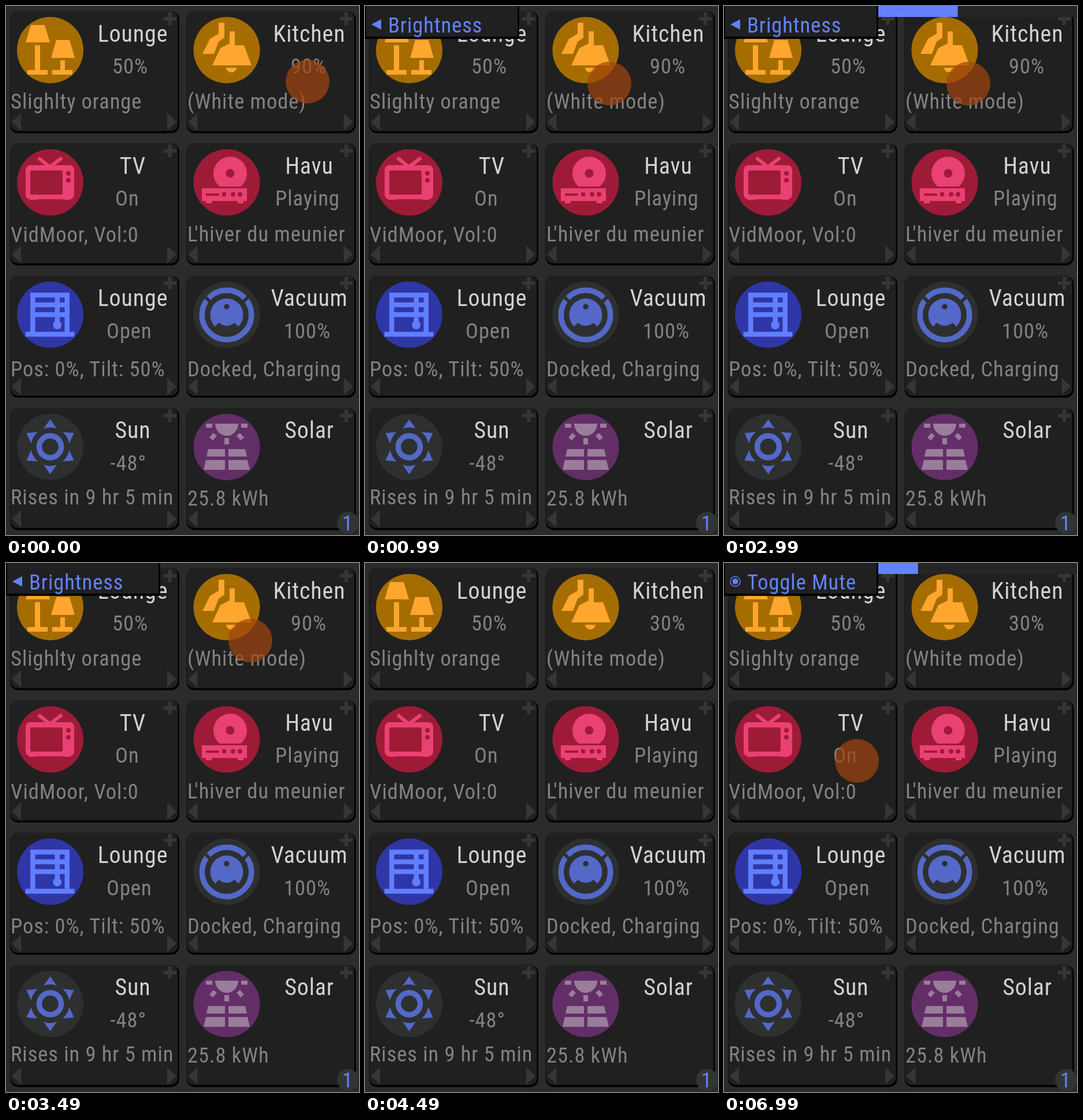
These frames come from a looping animation (611 px wide and 917 px high, 7.99 s). An HTML page:

```html
<!DOCTYPE html>
<html lang="en">
<head>
<meta charset="utf-8">
<title>Home panel</title>
<style>
html, body { margin: 0; width: 100%; height: 100%; overflow: hidden; background: #2a2c2a; }
svg { display: block; }
text { font: 36.5px "Roboto Condensed", Roboto, sans-serif; font-stretch: 75%; letter-spacing: .026em; fill: #828282; white-space: pre; }
.title { font-size: 40px; letter-spacing: .022em; fill: #d2d2d2; text-anchor: middle; }
#popup text, #badge text { fill: #6482ff; }
#popup .sign { font: 34px "DejaVu Sans", sans-serif; }
</style>
</head>
<body>
<svg id="stage" width="611" height="917" viewBox="0 0 611 917">
  <g id="cards"></g>

  <g id="icons">
    <!-- floor lamps -->
    <path fill="#ffa62f" d="M43 33H67L76 63H34ZM50 68h9v43h13v8H37v-8H50ZM87 59h23l9 31H78ZM94 94h8v17h13v8H80v-8h14Z"/>
    <!-- pendant lamps -->
    <path fill="#ffa62f" d="M368 29h10v26l-10 7-8 21h-20l13-26 15-9ZM387 44h9v24h16l13 35H357l14-30 16-8ZM381 107h18a9 8 0 0 1-18 0Z"/>
    <!-- television -->
    <g fill="#ea4173">
      <path d="M56 263L76 279 97 263" fill="none" stroke="#ea4173" stroke-width="6"/>
      <rect x="34" y="276" width="84" height="59" rx="8"/>
      <path d="M41 333h12v3H41ZM100 333h11v3h-11Z"/>
    </g>
    <g fill="#9e1b38">
      <rect x="42" y="285" width="56" height="42" rx="3"/>
      <circle cx="108" cy="290" r="4"/><circle cx="108" cy="302" r="4"/>
    </g>
    <!-- disc player -->
    <path fill="#ea4173" d="M370 313a29 29 0 1 1 36 0ZM339 316h78v22h-6v4h-10v-4h-45v4h-10v-4h-7Z"/>
    <g fill="#9e1b38">
      <circle cx="388" cy="290" r="7.5"/>
      <path d="M346 325h23v4h-23ZM374 323h7v7h-7Z"/>
      <circle cx="393" cy="326.500" r="4"/><circle cx="405" cy="326.500" r="4"/>
    </g>
    <!-- blinds -->
    <g transform="translate(76 535) scale(4.25)">
      <path fill="#607eff" d="M-8-9H8V7h2v2h-20V7h2Z"/>
      <path fill="#2f36a6" d="M-6-7h8v2h-8ZM4-7h2v2H4ZM-6-3h8v2h-8ZM4-3h2v2H4ZM-6 1H6v6H-6Z"/>
      <path fill="#607eff" d="M2 1h2v2H2Z"/>
      <circle cx="3" cy="4.250" r="1.750" fill="#607eff"/>
    </g>
    <!-- robot vacuum -->
    <g transform="translate(382 535.500) scale(4.75)" fill="#5468c8">
      <circle r="9" fill="none" stroke="#5468c8" stroke-width="2"/>
      <path d="M-8.500-7.250l3 3M8.500-7.250l-3 3" stroke="#2d302f" stroke-width="1.200"/>
      <path d="M-4.240 4.240A6 6 0 1 1 4.240 4.240L2.830 2.830A4 4 0 0 1-2.830 2.830Z"/>
      <circle cy="-3" r="1" fill="#2d302f"/>
    </g>
    <!-- sun -->
    <g transform="translate(76.500 764) scale(4.75)" fill="#5468c8">
      <circle r="4" fill="none" stroke="#5468c8" stroke-width="2"/>
      <g id="rays"></g>
    </g>
    <!-- solar panels -->
    <path fill="#997d9a" d="M362 724h40a20 21 0 0 1-40 0ZM346 724h11v7h-11ZM407 724h11v7h-11ZM378 749h8v11h-8ZM359 740l6 5-7 8-6-5ZM405 740l7 8-6 5-7-8ZM350 768h29v13h-32ZM385 768h29l3 13h-32ZM346 787h33v17h-37ZM385 787h33l4 17h-37Z"/>
  </g>

  <g id="badge">
    <circle cx="592" cy="896" r="19" fill="#323533"/>
    <text x="582" y="909">1</text>
  </g>

  <g id="bar">
    <rect x="267" width="344" height="19" fill="#242524"/>
    <rect id="fill" x="267" height="19" fill="#6482ff"/>
  </g>

  <g id="popup">
    <rect width="267" height="57"/>
    <rect x="2" width="262" height="53" fill="#202020"/>
    <g id="slide">
      <path d="M11 32l17-9v18Z" fill="#6482ff"/>
      <text x="40" y="46">Brightness</text>
    </g>
    <g id="hold">
      <circle cx="19.500" cy="32" r="8.500" fill="none" stroke="#6482ff" stroke-width="1.500"/>
      <path d="M19.500 23.500a8.500 8.500 0 0 1 0 17Z" fill="#6482ff"/>
      <text class="sign" x="46" y="45">✘</text>
      <text x="83" y="46">(Popup)</text>
    </g>
    <g id="press">
      <circle cx="19.500" cy="32" r="8.500" fill="none" stroke="#6482ff" stroke-width="1.500"/>
      <circle cx="19.500" cy="32" r="5" fill="#6482ff"/>
      <text x="40" y="46">Toggle Mute</text>
    </g>
  </g>

  <circle id="touch" r="38" fill="rgb(163,69,15)" fill-opacity=".7"/>
</svg>
<script>
const $ = id => document.getElementById(id);

// title, value, value x, detail, detail baseline, icon background
const cards = [
  ["Lounge", "50%", 184, "Slighlty orange", 178, "#a56d00"],
  ["Kitchen", "90%", 493, "(White mode)", 178, "#a56d00"],
  ["TV", "On", 189, "VidMoor, Vol:0", 409, "#9e1b38"],
  ["Havu", "Playing", 466, "L'hiver du meunier", 408, "#9e1b38"],
  ["Lounge", "Open", 174, "Pos: 0%, Tilt: 50%", 642, "#2f36a6"],
  ["Vacuum", "100%", 481, "Docked, Charging", 642, "#2d302f"],
  ["Sun", "-48°", 180.5, "Rises in 9 hr 5 min", 864, "#2d302f"],
  ["Solar", "", 0, "25.8 kWh", 866, "#632e67"]
];

$("cards").innerHTML = cards.map(([title, value, valueX, detail, detailY, color], i) => {
  const x = i % 2 * 305.5, y = (i >> 1) * 229.3;
  const next = i < 7 ? "M279 186v30l16-15Z" : "";
  return `<g transform="translate(${x} ${y})">
    <rect x="7" y="9" width="293" height="211.500" rx="14"/>
    <rect x="7.500" y="8.500" width="290" height="208.500" rx="13" fill="#202020"/>
    <path d="M26 186v30l-16-15Z${next}" fill="#363636"/>
    <path d="M272.500 22h22M283.500 11v22" stroke="#363636" stroke-width="6"/>
    <circle cx="76.500" cy="76.500" r="57.500" fill="${color}"/>
    <text class="title" x="219.500" y="61.500">${title}</text>
  </g>
  <text id="value${i}" x="${valueX}" y="${117 + y}">${value}</text>
  <text x="${i % 2 ? 314 : 8}" y="${detailY}">${detail}</text>`;
}).join("");

$("rays").innerHTML = [0, 1, 2, 3, 4, 5].map(i =>
  `<path d="M0-10L2.400-6.600A7 7 0 0 0-2.400-6.600Z" transform="rotate(${i * 60})"/>`).join("");

const steps = [
  { at: 0, touch: [522, 131], level: 90 },
  { at: 500, touch: [465, 133], level: 90, popup: "hold" },
  { at: 990, touch: [423, 134.5], level: 90, popup: "slide" },
  { at: 1490, touch: [423, 134.5], level: 90, popup: "slide", bar: 2 },
  { at: 1990, touch: [423, 134.5], level: 90, popup: "slide", bar: 3 },
  { at: 2990, touch: [423, 134.5], level: 90, popup: "slide", bar: 4 },
  { at: 3490, touch: [423, 134.5], level: 90, popup: "slide" },
  { at: 3990, level: 90, popup: "slide" },
  { at: 4490, level: 30 },
  { at: 5990, touch: [230, 343], level: 30, popup: "hold" },
  { at: 6990, touch: [230, 343], level: 30, popup: "press", bar: 2 }
];

const show = (id, on) => $(id).style.display = on ? "" : "none";
const start = performance.now();

function draw(now) {
  const t = Math.max(0, now - start) % 7990;
  const { touch, level, popup, bar } = steps.filter(s => s.at <= t).pop();
  show("touch", touch);
  if (touch) $("touch").setAttribute("transform", `translate(${touch})`);
  show("popup", popup);
  for (const id of ["slide", "hold", "press"]) show(id, id === popup);
  show("bar", bar);
  $("fill").setAttribute("width", (bar || 0) * 34.4);
  $("value1").textContent = level + "%";
  requestAnimationFrame(draw);
}
draw(start);
</script>
</body>
</html>
```
